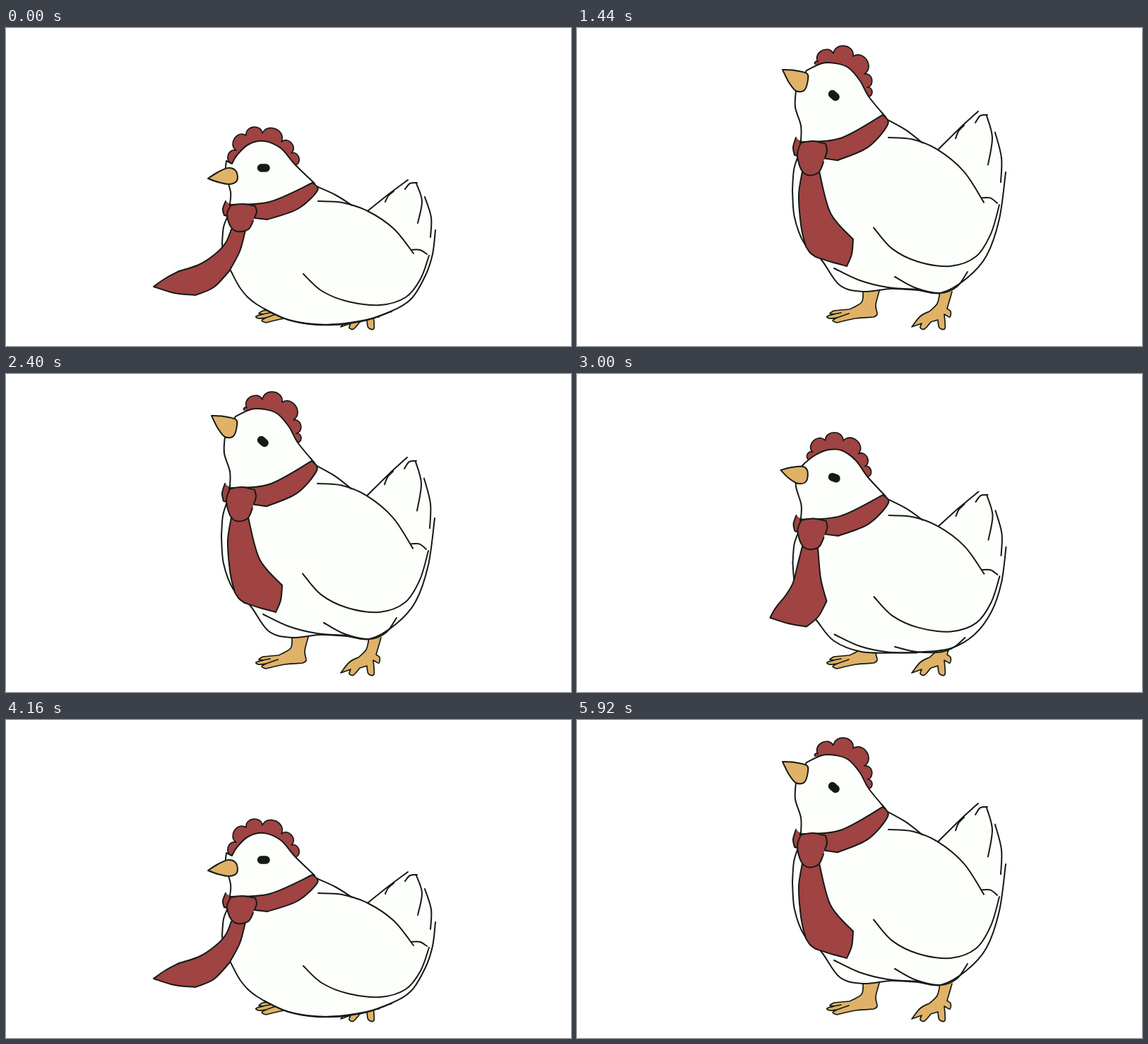
An HTML page for the animation above (6.04 s loop, 800 by 450 pixels).

```html
<!DOCTYPE html>
<html lang="en">
<head>
<meta charset="utf-8">
<title>Bobbing hen</title>
<style>
  html, body { margin: 0; width: 100%; height: 100%; overflow: hidden; background: #fff; }
  svg { display: block; width: 100vw; height: 100vh; }
  path { stroke: #151a15; stroke-width: 2; stroke-linecap: round; stroke-linejoin: round; fill: none; }
  .plume { fill: #fdfffc; }
  .red { fill: #9f4343; }
  .gold { fill: #dfb267; }
  .bare { stroke: none; }
  .thin { stroke-width: 1.7; }
  .eye { stroke-width: 11.5; }
</style>
</head>
<body>
<svg id="stage" viewBox="0 0 800 450" xmlns="http://www.w3.org/2000/svg"></svg>
<script>
const LOOP = 6040, BOB = 320, HOLD = 120, TURN = 160;
const svg = document.getElementById('stage');
const shapes = [];

// Points are "x y" pairs; "|" marks a corner.
const parse = text => text.split('|').map(run => {
  const n = run.trim().split(/\s+/).map(Number);
  return n.flatMap((x, i) => i % 2 ? [] : [[x, n[i + 1]]]);
});

// The trunk keeps its drawing and only stretches upward.
const raise = runs => runs.map(run => run.map(([x, y]) => [x - 1, y * 1.237 - 148]));

const blend = (low, high, k) => low.map((run, r) => run.map((p, i) =>
  p.map((v, axis) => v + (high[r][i][axis] - v) * k)));

function smooth(runs) {
  let last = runs[0][0], d = 'M' + last;
  runs.forEach((run, r) => {
    const pts = r ? [last, ...run] : run;
    for (let i = 1; i < pts.length; i++) {
      const a = pts[i - 1], b = pts[i];
      const before = pts[i - 2] || a, after = pts[i + 1] || b;
      const c1 = a.map((v, n) => v + (b[n] - before[n]) / 6);
      const c2 = b.map((v, n) => v - (after[n] - a[n]) / 6);
      d += 'C' + [c1, c2, b];
    }
    last = pts[pts.length - 1];
  });
  return d;
}

// Round lobes standing on a line of points.
function lobes([pts]) {
  let d = 'M' + pts[0];
  for (let i = 1; i < pts.length; i++) {
    const [ax, ay] = pts[i - 1], [bx, by] = pts[i];
    const ox = (by - ay) * 0.6, oy = (ax - bx) * 0.6;
    d += 'C' + [ax + ox, ay + oy, bx + ox, by + oy, bx, by];
  }
  return d;
}

// Without a second outline, the upright one follows from the crouched one.
function add(look, crouched, upright, draw = smooth) {
  const low = parse(crouched);
  const high = upright ? parse(upright) : raise(low);
  const el = document.createElementNS(svg.namespaceURI, 'path');
  el.setAttribute('class', look);
  svg.append(el);
  shapes.push({ el, poses: [0, 0.5, 1].map(k => draw(blend(low, high, k))) });
}

// The feet stay planted; the body sinks over them.
const still = points => add('gold thin', points, points);
still('405 372 403 388 386 398 | 364 400 | 358 404 364 405 | 354 408 358 411 368 410 | 362 414 368 417 | 394 411 420 409 | 425 405 423 392 428 372');
still('363 405 374 403');
still('368 410 385 404');
still('514 373 510 390 499 401 | 486 408 474 423 | 488 418 | 486 424 492 426 501 416 | 511 413 | 513 424 521 425 520 405 | 528 409 529 401 524 397 | 527 387 531 373');

function drawTrunk() {
  add('plume bare', '314 266 | 317 249 | 437 220 | 512 259 | 569 215 | 582 219 | 593 239 | 608 286 | 306 305');
  add('plume',
    '306 305 309 326 318 343 333 370 355 391 400 413 455 420 503 415 545 401 574 383 594 350 604 320 608 286',
    '305 230 308 268 322 305 346 328 372 364 405 373 445 369 482 371 515 375 552 354 580 322 598 270 607 204');
  add('', '314 266 308 282 306 305');
  const belly = '365 397 400 413 440 420 480 419';
  add('', belly, '364 340 400 357 440 367 482 370');
  const thigh = '450 420 480 418 515 412 530 407 546 401';
  add('', thigh, '450 352 480 368 515 375 538 366 553 345');
}

function drawWing() {
  add('', '437 223 466 236 490 251');
  add('', '442 245 476 247 512 259 549 284 577 319');
  add('', '574 314 586 314 596 320');
  add('', '421 348 447 372 484 387 530 392 566 381 587 355 599 322');
}

function drawTail() {
  add('', '569 215 542 235 512 259');
  add('', '537 246 541 238 549 231');
  add('', '565 228 572 220 582 219');
  add('', '581 220 589 245 583 276');
  add('', '593 239 602 268 601 296');
}

function drawHead() {
  add('red thin',
    '320 192 326 173 340 152 363 149 390 161 404 177 410 194',
    '337 51 341 48 363 36 391 40 407 65 411 84 413 97', lobes);
  add('plume',
    '317 249 318 232 311 206 312 188 | 320 192 | 327 180 343 165 365 160 389 170 409 193 437 220',
    '317 160 317 138 309 112 310 88 | 325 60 | 347 50 366 50 384 56 401 75 413 97 437 126');
  add('gold',
    '286 213 300 204 315 198 326 203 327 216 316 221 300 218 286 213',
    '291 59 308 60 325 64 327 73 322 88 310 89 300 77 291 59');
  add('eye', '361.5 198 368 198', '361.5 93.5 366 97.5');
}

function drawScarf() {
  add('red',
    '319 285 311 304 296 320 273 335 245 344 | 226 354 209 366 | 238 375 268 378 | 294 367 316 344 | 331 316 339 286',
    '319 203 314 235 316 270 319 290 324 309 | 330 318 338 324 | 360 331 382 337 | 389 320 391 299 | 359 262 343 203');
  add('red', '311 245 307 256 309 265 | 317 267 | 317 249');
  add('red', '317 250 373 246 434 219 | 441 230 413 256 370 271 | 335 267');
  add('red', '350 273 343 285 328 288 318 281 313 264 318 251 | 335 249 353 252 | 355 260 352 268');
}

drawTrunk();
drawWing();
drawTail();
drawHead();
drawScarf();

// Poses: crouched, halfway, upright.
function poseAt(time) {
  const t = time % LOOP % BOB;
  if (t % TURN >= HOLD) return 1;
  return t < TURN ? 0 : 2;
}

let shown = -1;
function show(pose) {
  if (pose === shown) return;
  shown = pose;
  for (const { el, poses } of shapes) el.setAttribute('d', poses[pose]);
}

show(0);
const start = performance.now();
function tick() {
  show(poseAt(performance.now() - start));
  requestAnimationFrame(tick);
}
requestAnimationFrame(tick);
</script>
</body>
</html>
```
